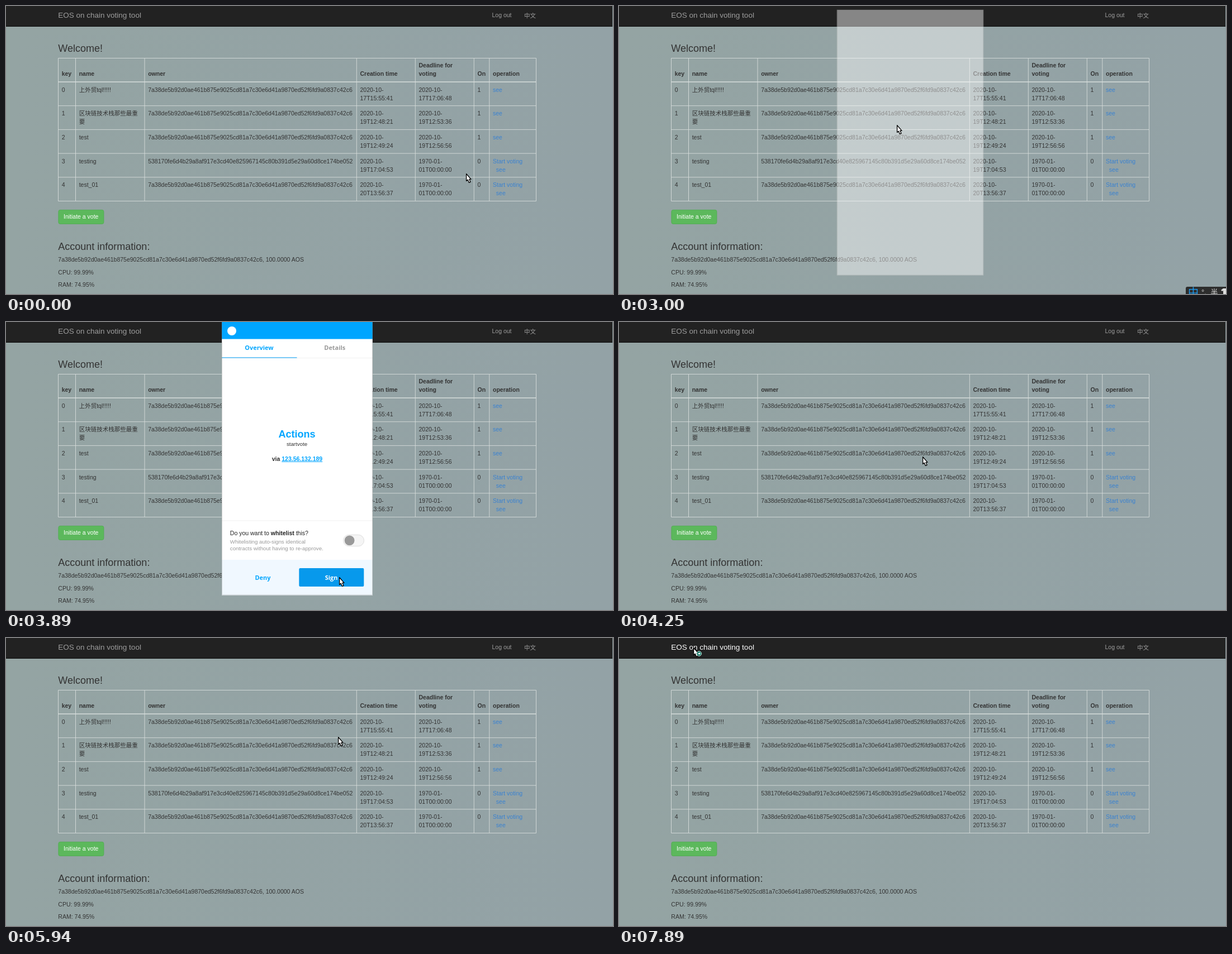
Write an HTML page that moves like this. It is 1086 by 516 pixels and loops after 8 s.

```html
<!DOCTYPE html>
<html lang="en">
<head>
<meta charset="utf-8">
<title>On chain voting tool</title>
<style>
  html, body { margin: 0; width: 100%; height: 100%; overflow: hidden; background: #94a3a4; }
  svg { display: block; width: 100%; height: 100%; }
  text { font: 10.5px "Liberation Sans", Arial, "Noto Sans CJK SC", "Noto Sans CJK", sans-serif; fill: #333; white-space: pre; }
  .bold { font-weight: bold; }
  .h3 { font-size: 18px; }
  .brand { font-size: 13.5px; }
  .nav { fill: #9d9d9d; }
  .nav.lit { fill: #fff; }
  .link { fill: #3b82d0; }
  .white { fill: #fff; }
  .grid { fill: none; stroke: #d6dcdb; }
  .mid { text-anchor: middle; }
  .ui { font: bold 10.9px "Open Sans", "Noto Sans", sans-serif; }
  .blue { fill: #03a6ff; }
  .grey { fill: #999; }
  .small { font-size: 9.7px; }
</style>
</head>
<body>
<svg viewBox="0 0 1086 516">
  <defs>
    <filter id="shadow" x="-5%" y="-20%" width="110%" height="150%">
      <feDropShadow dx="0" dy="1" stdDeviation="1.3" flood-opacity=".5"/>
    </filter>
    <linearGradient id="page">
      <stop offset="0" stop-color="#94a4a3"/>
      <stop offset="1" stop-color="#93a2a6"/>
    </linearGradient>
  </defs>

  <rect width="1086" height="516" fill="url(#page)"/>
  <rect width="1085" height="36" fill="#222"/>
  <rect y="36" width="1085" height="1" fill="#0b0b0b"/>
  <text id="brand" class="nav brand" x="93.3" y="21.4">EOS on chain voting tool</text>
  <text id="logout" class="nav" x="869.5" y="20.2">Log out</text>
  <text class="nav" x="927" y="20.5">中文</text>

  <text class="h3" x="93.3" y="82">Welcome!</text>
  <g id="table"></g>

  <rect x="93.9" y="365.4" width="81" height="25" rx="3" fill="#5cb85c" stroke="#4cae4c" stroke-width=".8"/>
  <text class="white" x="103" y="381.2">Initiate a vote</text>
  <text class="h3" x="93.3" y="436.8">Account information:</text>
  <text id="account" x="93.3" y="458.4"></text>
  <text x="93.3" y="481">CPU: 99.99%</text>
  <text x="93.3" y="503.3">RAM: 74.95%</text>

  <g id="ime">
    <path d="M1014 516V506q0-3 3-3h69v13z" fill="#2d2d2d"/>
    <text x="1018" y="519.5" style="font-size:19px;fill:#1e9bf0">中</text>
    <text x="1042" y="517" style="font-size:13px;fill:#ddd">°,</text>
    <text x="1058.5" y="516.5" style="font-size:13px;fill:#ddd">半</text>
    <path d="M1077 509l4-3h5v10h-5v-6l-2 1z" fill="#ddd"/>
  </g>

  <g id="popup">
    <rect x="386" width="270" height="489.5" fill="#fff"/>
    <g id="request">
      <rect x="386" width="270" height="30.5" fill="#00a5ff"/>
      <circle cx="404" cy="16" r="8" fill="#fff"/>
      <text class="ui blue mid" x="453" y="50">Overview</text>
      <text class="ui grey mid" x="588.3" y="50">Details</text>
      <rect x="386" y="64" width="270" height="1" fill="#f0f0f0"/>
      <rect x="386" y="63.3" width="134.5" height="1.2" fill="#25abf5"/>
      <text class="bold h3 blue mid" x="520.5" y="207">Actions</text>
      <text class="small mid" x="520.5" y="222">startvote</text>
      <text class="bold" x="475.7" y="248.8">via <tspan class="blue" text-decoration="underline">123.56.132.189</tspan></text>
      <rect x="386" y="355.5" width="270" height="1" fill="#f0f0f0"/>
      <text x="400.8" y="381.6" style="fill:#222">Do you want to <tspan class="bold">whitelist</tspan> this?</text>
      <text class="small grey" x="400.8" y="397.3">Whitelisting auto-signs identical</text>
      <text class="small grey" x="400.8" y="408.6">contracts without having to re-approve.</text>
      <rect x="603.5" y="381.3" width="37" height="20.4" rx="10.2" fill="#f5f5f5" stroke="#ddd"/>
      <circle cx="614.6" cy="391.4" r="8.9" fill="#999"/>
      <rect x="386" y="426" width="270" height="63.5" fill="#f0f8ff"/>
      <text class="ui blue mid" x="459.5" y="461.5">Deny</text>
      <rect id="sign" x="524.3" y="441" width="116" height="33" rx="2"/>
      <text class="ui white mid" x="582" y="461.5">Sign</text>
    </g>
    <rect x="386.5" y="-1" width="269" height="490" fill="none" stroke="#777" stroke-opacity=".35"/>
  </g>

  <g id="alert">
    <rect x="352.7" y="-3" width="336" height="70.7" rx="1" fill="#fff" filter="url(#shadow)"/>
    <text x="364.5" y="15.8" class="ui" style="font-weight:normal;font-size:10px;fill:#444">success!</text>
    <rect x="628.6" y="31.8" width="48.4" height="24" rx="3" fill="#3c85ea"/>
    <text class="white mid" x="652.8" y="47.4" style="font-size:9.3px;font-weight:500">确定</text>
  </g>

  <g id="cursor" stroke-linejoin="round">
    <g id="arrow">
      <path d="M.6.8V13.4L3.2 11.2 5.4 16.4 8 15.3 5.9 10.4H9z" fill="#fff" stroke="#000" stroke-width="1.3"/>
    </g>
    <g id="badge">
      <circle cx="10.3" cy="11" r="4.2" fill="#0d7564" stroke="#d5efe8" stroke-width="1"/>
      <path d="M8 12q0-2 2.3-2V8.6l2.7 2.4-2.7 2.3V12z" fill="#fff"/>
    </g>
    <path id="hand" d="M4 10V1.5q1.2-1.6 2.3 0V6l4.5 1.2q1 .5 1 1.8l-.8 4-1 3.3H5L1 11q-.8-2 1-1.8z" fill="#fff" stroke="#000"/>
    <path id="beam" d="M0 .5h2l1 1 1-1h2M3 1v12M0 13.5h2l1-1 1 1h2" fill="none" stroke="#111"/>
  </g>
</svg>

<script>
const LOOP = 8000;
const el = id => document.getElementById(id);
const show = (id, visible) => el(id).setAttribute("display", visible ? "inline" : "none");

const owner = "7a38de5b92d0ae461b875e9025cd81a7c30e6d41a9870ed52f6fd9a0837c42c6";
const tester = "538170fe6d4b29a8af917e3cd40e825967145c80b391d5e29a60d8ce174be052";
const closed = "1970-01-\n01T00:00:00";
const header = ["\nkey", "\nname", "\nowner", "\nCreation time", "Deadline for\nvoting", "\nOn", "\noperation"];
const start = "Start voting\n  see";
const rows = [
  ["0", "上外贸tql!!!!!", owner, "2020-10-\n17T15:55:41", "2020-10-\n17T17:06:48", "1", "see"],
  ["1", "区块链技术栈那些最重\n要", owner, "2020-10-\n19T12:48:21", "2020-10-\n19T12:53:36", "1", "see"],
  ["2", "test", owner, "2020-10-\n19T12:49:24", "2020-10-\n19T12:56:56", "1", "see"],
  ["3", "testing", tester, "2020-10-\n19T17:04:53", closed, "0", start],
  ["4", "test_01", owner, "2020-10-\n20T13:56:37", closed, "0", start]
];
const columns = [93.5, 124.5, 248, 627.3, 732.3, 837.3, 864.8];
const rowHeight = 42.7;

const cells = (row, y, style) => row.map((cell, c) =>
  cell.split("\n").map((line, n) =>
    `<text class="${style || (c === 6 ? "link" : "")}" x="${columns[c] + 6.2}" y="${y + n * 15}">${line}</text>`
  ).join("")).join("");

const rules = rows.slice(1).map((_, i) => `M93.5 ${136 + rowHeight * (i + 1)}H948.5`).join("");
const dividers = columns.slice(1).map(x => `M${x} 93.5V349.5`).join("");
el("table").innerHTML =
  `<path class="grid" stroke-width=".9" d="M93.5 93.5H948.5V349.5H93.5z${rules}${dividers}"/>` +
  `<path class="grid" stroke-width="1.6" d="M93.5 136H948.5"/>` +
  cells(header, 110.4, "bold") +
  rows.map((row, i) => cells(row, 153.6 + rowHeight * i)).join("");
el("account").textContent = owner + ", 100.0000 AOS";

const pointer = [
  [0, 823, 300], [130, 514, 216], [280, 497, 213],
  [3380, 508, 245], [3500, 542, 325], [3620, 580, 415], [3740, 597, 458], [3890, 596, 457],
  [4130, 575, 370], [4250, 543, 241],
  [5230, 588, 106], [5380, 641, 56], [5510, 654, 43], [5660, 645, 34], [5810, 635, 70], [5940, 594, 177],
  [6220, 595, 177], [6370, 756, 90, "beam"], [6520, 820, 58], [6650, 856, 31],
  [6800, 872, 20, "hand"], [6930, 882, 15, "hand"], [7080, 857, 23, "badge"],
  [7230, 600, 78], [7350, 314, 67], [7500, 205, 36], [7620, 128, 14, "hand"],
  [7770, 130, 15, "hand"], [7890, 133, 17, "badge"]
];
// [time, opacity, scale]
const popupStates = [
  [0, 0, 1], [3000, .45, .972], [3120, .88, .993], [3240, 1, 1], [4130, .5, .975], [4250, 0, 1]
];
const stateAt = (states, t) => states.findLast(s => s[0] <= t);
const between = (t, from, to) => t >= from && t < to;

function render(t) {
  const [, x, y, shape = "arrow"] = stateAt(pointer, t);
  el("cursor").setAttribute("transform", `translate(${x} ${y})`);
  show("arrow", shape === "arrow" || shape === "badge");
  for (const id of ["badge", "hand", "beam"]) show(id, shape === id);

  const [, opacity, scale] = stateAt(popupStates, t);
  el("popup").setAttribute("opacity", opacity);
  el("popup").setAttribute("transform", `translate(520.7 245) scale(${scale}) translate(-520.7 -245)`);
  show("popup", opacity > 0);
  show("request", t >= 3240);
  el("sign").setAttribute("fill", t >= 3740 ? "#0799ec" : "#03a6ff");
  show("ime", between(t, 3000, 3890));

  show("alert", between(t, 4830, 5810));
  el("alert").setAttribute("opacity", t < 4950 ? .6 : 1);
  el("logout").classList.toggle("lit", between(t, 6800, 7770));
  el("brand").classList.toggle("lit", t >= 7620);
}

const begin = performance.now();
function tick() {
  render((performance.now() - begin) % LOOP);
  requestAnimationFrame(tick);
}
tick();
</script>
</body>
</html>
```
